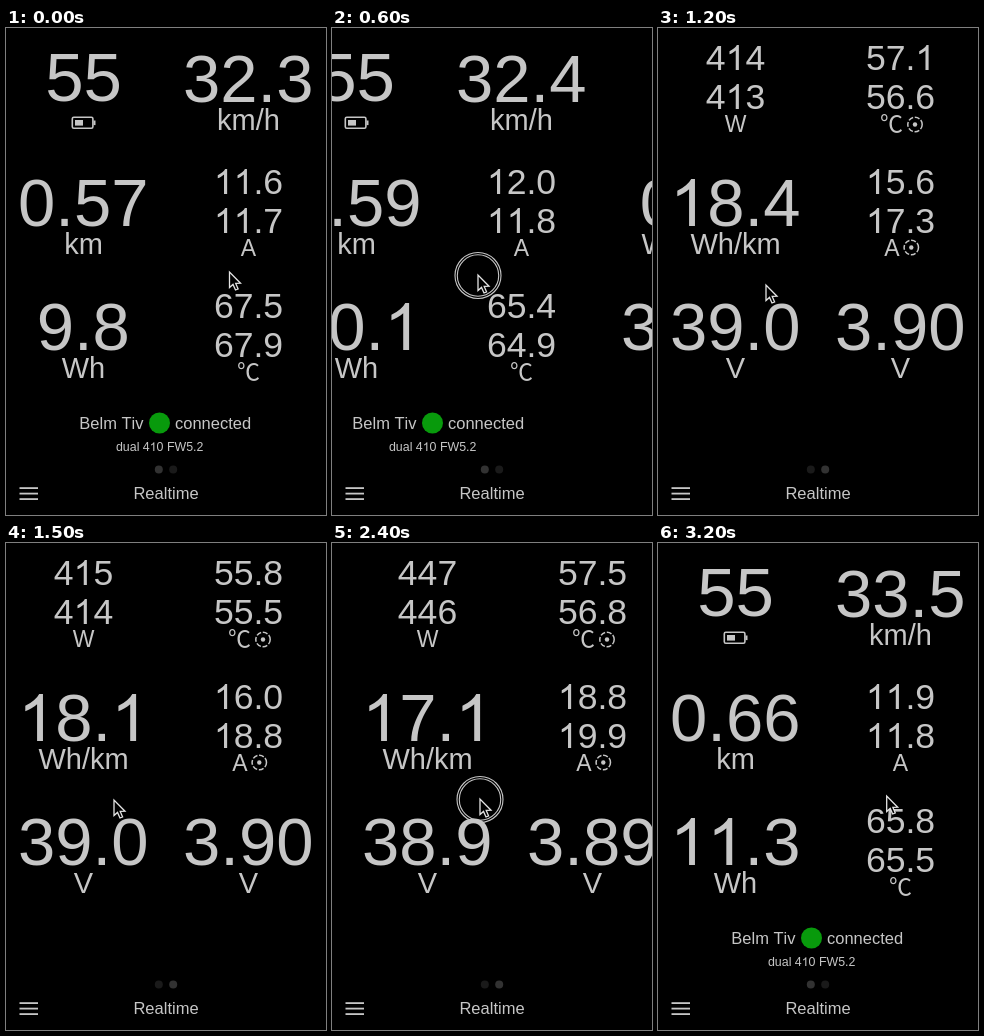
Write an HTML page with a canvas that moves like this. It is 320 px wide and 487 px high and loops after 3300 ms.

```html
<!DOCTYPE html>
<html lang="en">
<head>
<meta charset="utf-8">
<title>Realtime dashboard</title>
<style>
  html, body { margin: 0; width: 100%; height: 100%; overflow: hidden; background: #000; }
  canvas { display: block; }
</style>
</head>
<body>
<canvas id="stage" width="320" height="487"></canvas>
<script>
const ctx = document.getElementById('stage').getContext('2d');
const LOOP = 3300, STEP = 100, PAGE = 330, SETTLE = 400;
const LEFT = 77.5, RIGHT = 242.5, ROW = 124;
const INK = '#c6c6c6';
const SANS = '"Liberation Sans", Arial, sans-serif';
const CJK = '"Noto Sans CJK SC", "Noto Sans CJK JP", "Noto Sans CJK", sans-serif';

// A numeral one without a foot, in units of 1/2048 em
const ONE = new Path2D('M763 0H583V-1120Q518-1060 412-998T223-906V-1076Q374-1146 487-1245T647-1440H763Z');

const clamp = v => Math.max(0, Math.min(1, v));
const outCubic = u => 1 - (1 - clamp(u)) ** 3;

// Linear interpolation through points, held at both ends
function track(t, times, values) {
  let i = 0;
  while (i < times.length - 2 && t >= times[i + 1]) i++;
  const u = clamp((t - times[i]) / (times[i + 1] - times[i]));
  return values[i] + (values[i + 1] - values[i]) * u;
}

const RIDE = [0, 600, 900, 2700, 3200];
const POWER = [900, 1500, 2100, 2700];
const MOVES = [0, 400, 500, 600, 700, 2300, 2400, 2500, 2600, 3200, 3300];
const POINTER_X = [223.5, 221, 190, 146, 108, 108, 148, 190, 228.7, 228.7, 223.5];
const POINTER_Y = [244, 244, 245, 247, 257, 257, 256, 254, 253, 253, 244];
const FORWARD = 714, BACK = 2620;

function scrollAt(t, x) {
  if (t < FORWARD) return Math.max(0, 199 - x);
  if (t < 2300) return 91 + (PAGE - 91) * outCubic((t - FORWARD) / SETTLE);
  if (t < BACK) return PAGE - Math.max(0, x - 130);
  return 232 * (1 - outCubic((t - BACK) / SETTLE));
}

function drawOne(x, y, size) {
  ctx.save();
  ctx.translate(x, y);
  ctx.scale(size / 2048, size / 2048);
  ctx.fill(ONE);
  ctx.restore();
}

function text(str, x, y, size, align = 'center', family = SANS) {
  ctx.font = `${size}px ${family}`;
  ctx.fontKerning = 'none';
  ctx.textAlign = 'left';
  x -= ctx.measureText(str).width * { left: 0, center: .5, right: 1 }[align];
  for (const part of str.split(/(1)/)) {
    if (part === '1') drawOne(x, y, size);
    else ctx.fillText(part, x, y);
    x += ctx.measureText(part).width;
  }
}

function circle(x, y, r, fill) {
  ctx.beginPath();
  ctx.arc(x, y, r, 0, 7);
  if (fill) { ctx.fillStyle = fill; ctx.fill(); } else ctx.stroke();
}

function big(value, unit, x, row) {
  text(value, x - .3, 74 + row * ROW, 67);
  text(unit, x, 102 + row * ROW, 29);
}

function pair(a, b, x, row) {
  text(a, x, 42 + row * ROW, 35.6);
  text(b, x, 81 + row * ROW, 35.6);
}

function smallUnit(unit, x, row) {
  text(unit, x, 103.7 + row * ROW, 23, 'center', unit === '℃' ? CJK : SANS);
}

function motorIcon(x, y) {
  ctx.lineWidth = 1.5;
  ctx.setLineDash([5, 1.7]);
  circle(x, y, 7.2);
  ctx.setLineDash([]);
  circle(x, y, 2.2, INK);
}

function battery() {
  ctx.lineWidth = 1.6;
  ctx.beginPath();
  ctx.roundRect(66.3, 89.3, 20.6, 11, 1.5);
  ctx.stroke();
  ctx.fillRect(87.5, 92.5, 2, 4.6);
  ctx.fillRect(69, 92, 8, 5.6);
}

function ridePage(t) {
  const num = (digits, ...values) => track(t, RIDE, values).toFixed(digits);
  text('55', LEFT, 72.5, 69);
  battery();
  big(num(1, 32.3, 32.4, 32.6, 30.3, 33.5), 'km/h', RIGHT, 0);
  big(num(2, .57, .59, .6, .65, .66), 'km', LEFT, 1);
  pair(num(1, 11.6, 12, 12, 11.3, 11.9), num(1, 11.7, 11.8, 11.8, 11.2, 11.8), RIGHT, 1);
  smallUnit('A', RIGHT, 1);
  big(num(1, 9.8, 10.1, 10.3, 11.1, 11.3), 'Wh', LEFT, 2);
  pair(num(1, 67.5, 65.4, 65.4, 65.4, 65.8), num(1, 67.9, 64.9, 65, 65.7, 65.5), RIGHT, 2);
  smallUnit('℃', RIGHT, 2);
  text('Belm Tiv', 137.5, 401, 16.5, 'right');
  text('connected', 169, 401, 16.5, 'left');
  text('dual 410 FW5.2', 153.7, 423, 12.4);
  circle(153.5, 395, 10.5, '#089a0c');
  ctx.fillStyle = INK;
}

function powerPage(t) {
  const num = (digits, ...values) => track(t, POWER, values).toFixed(digits);
  pair(num(0, 412, 415, 455, 438), num(0, 411, 414, 455, 436), LEFT, 0);
  smallUnit('W', LEFT, 0);
  pair(num(1, 58.5, 55.8, 57.9, 57), num(1, 57.7, 55.5, 57.1, 56.5), RIGHT, 0);
  smallUnit('℃', 233.5, 0);
  motorIcon(257, 96.5);
  big(t < 1000 ? '0.0' : num(1, 18.6, 18.1, 16.9, 17.4), 'Wh/km', LEFT, 1);
  pair(num(1, 15.2, 16, 19.6, 18), num(1, 15.7, 18.8, 21.2, 18.5), RIGHT, 1);
  smallUnit('A', 234, 1);
  motorIcon(253.3, 219.5);
  big(num(1, 39, 39, 38.9, 38.9), 'V', LEFT, 2);
  big(num(2, 3.9, 3.9, 3.89, 3.89), 'V', RIGHT, 2);
}

function footer(t) {
  const second = clamp((t - 760) / 100) - clamp((t - 2650) / 100);
  [1 - second, second].forEach((on, i) => {
    const c = 26 + 24 * on;
    circle(152.8 + 14.4 * i, 441.5, 4, `rgb(${c},${c},${c})`);
  });
  ctx.fillStyle = INK;
  text('Realtime', 160, 471, 16.5);
  for (const y of [459.2, 464.7, 470.2]) ctx.fillRect(13.5, y, 18.5, 1.8);
}

function pointer(x, y, pressed) {
  ctx.save();
  ctx.translate(x, y);
  if (pressed) {
    ctx.lineWidth = 1.1;
    circle(0, .5, 23);
    circle(0, .5, 20.7);
  }
  ctx.beginPath();
  [[0, 0], [0, 15.5], [3.5, 12.4], [6, 18], [8.6, 17], [6.2, 11.4], [11, 11.2]]
    .forEach(p => ctx.lineTo(...p));
  ctx.closePath();
  ctx.fillStyle = '#000';
  ctx.fill();
  ctx.strokeStyle = '#e4e4e4';
  ctx.lineWidth = 1.3;
  ctx.stroke();
  ctx.restore();
}

function draw(t) {
  const x = track(t, MOVES, POINTER_X), y = track(t, MOVES, POINTER_Y);
  const scroll = scrollAt(t, x);
  ctx.fillStyle = '#000';
  ctx.fillRect(0, 0, 320, 487);
  ctx.fillStyle = ctx.strokeStyle = INK;
  ctx.save();
  ctx.translate(-scroll, 0);
  ridePage(t);
  ctx.translate(PAGE, 0);
  powerPage(t);
  ctx.restore();
  footer(t);
  pointer(x, y, (t >= 400 && t < FORWARD) || (t >= 2100 && t < BACK));
}

const start = performance.now();
function tick() {
  const t = (performance.now() - start) % LOOP;
  draw(Math.floor(t / STEP) * STEP);
  requestAnimationFrame(tick);
}
tick();
</script>
</body>
</html>
```
